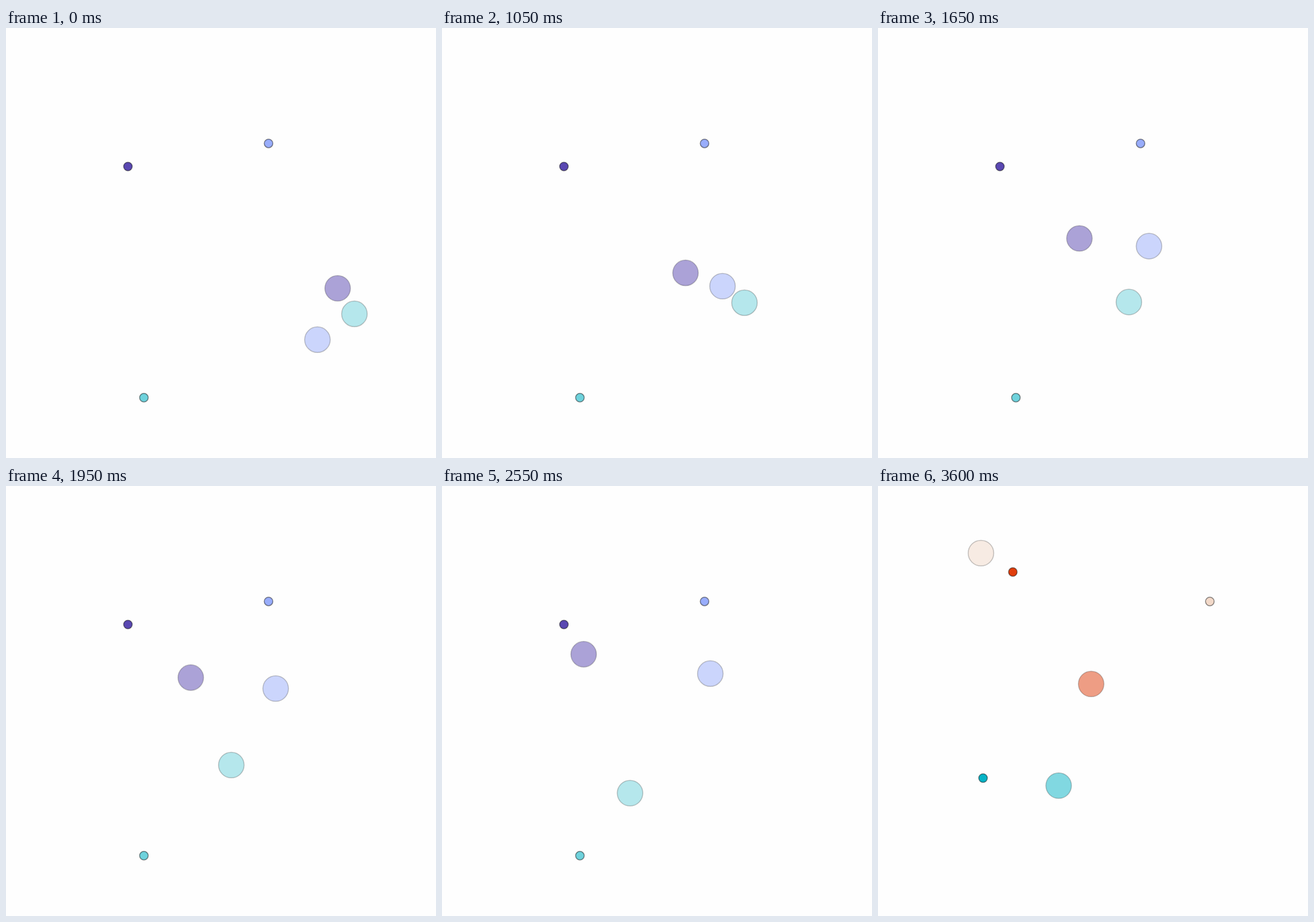
These frames come from a looping animation (700x700 px, 3750 ms). An HTML page with a canvas:

```html
<!DOCTYPE html>
<html lang="en">
<head>
<meta charset="utf-8">
<title>Drifting circles</title>
<style>
  html, body { margin: 0; width: 100%; height: 100%; overflow: hidden; background: #fefefe; }
  canvas { display: block; width: 700px; height: 700px; }
</style>
</head>
<body>
<canvas id="stage" width="700" height="700"></canvas>
<script>
const ctx = document.getElementById('stage').getContext('2d');
const STEP = 150, STEPS = 25, SCENE_CUT = 24;
const KEY_STEPS = [0, 3, 6, 9, 13, 17, 21];

// Drifting circles pass one waypoint at each key step.
const drifting = [
  { color: '110,210,220', dot: [224.5, 601.8], path: [
    [567.2, 465.4], [527, 461], [508, 450], [452, 444.4], [366.8, 454.2], [306.1, 500], [275.8, 552.4]] },
  { color: '153,173,251', dot: [427.4, 187.9], path: [
    [507, 507.4], [492, 468], [464, 436], [445.8, 385.6], [439, 329.8], [436.8, 305.4], [436.1, 297.5]] },
  { color: '90,72,178', dot: [198.5, 225.4], path: [
    [539.9, 423.8], [492, 424], [419, 408], [356.2, 374.4], [300.8, 311.9], [230.6, 273.9], [213.3, 256.3]] }
];
const resting = [
  { color: '242,217,201', dot: [540.2, 188], spot: [167.6, 109.3] },
  { color: '224,62,12', dot: [219.5, 140], spot: [347, 322.2] },
  { color: '6,179,198', dot: [171, 475.5], spot: [294.1, 487.8] }
];

// Mean speed around a key, halved at both ends so the path eases in and out.
function velocity(path, key, axis) {
  const from = Math.max(key - 1, 0), to = Math.min(key + 1, path.length - 1);
  const speed = (path[to][axis] - path[from][axis]) / (KEY_STEPS[to] - KEY_STEPS[from]);
  return from === key || to === key ? speed / 2 : speed;
}

function pointAt(path, step) {
  const last = path.length - 1;
  const next = KEY_STEPS.findIndex(k => k > step);
  const key = next < 0 ? last : next - 1;
  const elapsed = step - KEY_STEPS[key];
  return [0, 1].map(axis => {
    const a = path[key][axis], va = velocity(path, key, axis);
    if (key === last) return a + va * elapsed;
    const b = path[next][axis], vb = velocity(path, next, axis);
    const span = KEY_STEPS[next] - KEY_STEPS[key], u = elapsed / span;
    return a + (b - a) * u * u * (3 - 2 * u)
      + span * u * (1 - u) * (va * (1 - u) - vb * u);
  });
}

function circle([x, y], radius, color, alpha) {
  ctx.beginPath();
  ctx.arc(x, y, radius, 0, Math.PI * 2);
  ctx.fillStyle = `rgba(${color},${alpha})`;
  ctx.fill();
  ctx.lineWidth = 1.5;
  ctx.strokeStyle = `rgba(0,0,0,${alpha * 0.45})`;
  ctx.stroke();
}

function draw(now) {
  const step = Math.floor(now / STEP) % STEPS;
  const scene = step < SCENE_CUT ? drifting : resting;
  ctx.fillStyle = '#fefefe';
  ctx.fillRect(0, 0, 700, 700);
  for (const { color, dot } of scene) circle(dot, 7, color, 1);
  for (const { color, path, spot } of scene) circle(spot || pointAt(path, step), 20.8, color, 0.5);
}

const start = performance.now();
function tick() {
  draw(performance.now() - start);
  requestAnimationFrame(tick);
}
tick();
</script>
</body>
</html>
```
